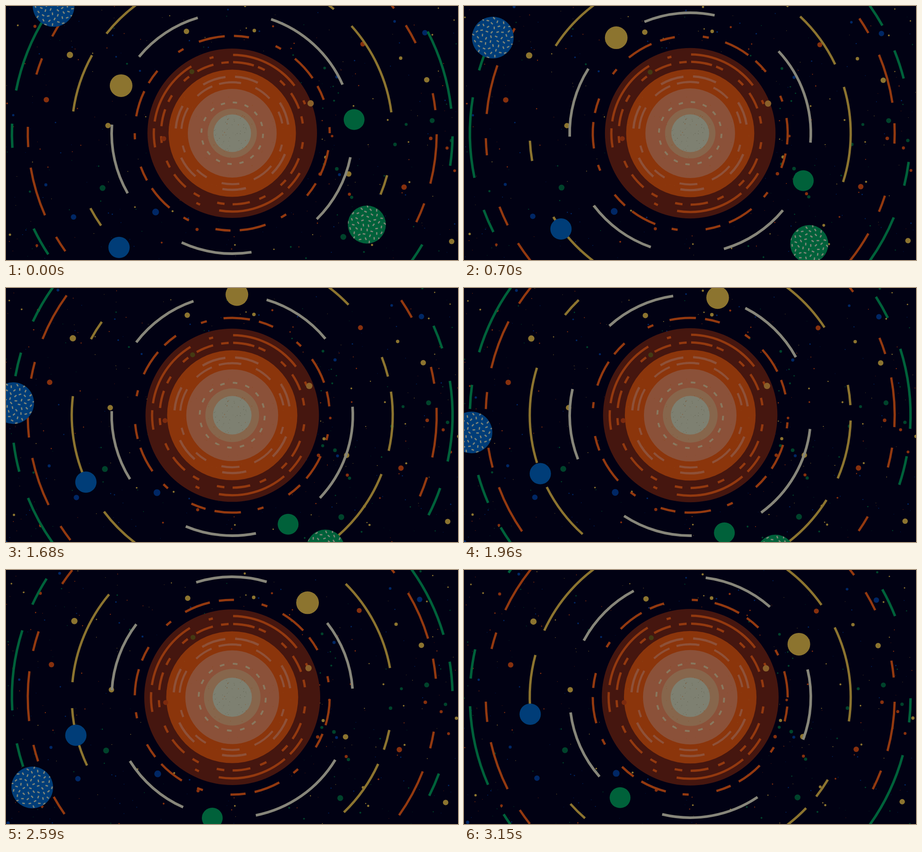
Animation of 997 by 561 pixels, one loop 3220 ms. Source, as an HTML page with a canvas:

```html
<!DOCTYPE html>
<html lang="en">
<head>
<meta charset="utf-8">
<title>Orbits</title>
<style>
  html, body { margin: 0; width: 100%; height: 100%; overflow: hidden; background: #010113; }
  canvas { display: block; }
</style>
</head>
<body>
<canvas id="stage" width="997" height="561"></canvas>
<script>
const ctx = document.getElementById('stage').getContext('2d');
const W = 997, H = 561, CX = 499, CY = 281;
const LOOP = 3220, TICK = 70, STEPS = 36;
const RAD = Math.PI / 180, TAU = Math.PI * 2, GOLDEN = Math.PI * (3 - Math.sqrt(5));

const C = {
  sky: '#010113', white: '#87867a', yellow: '#8c742f', orange: '#93390f',
  green: '#00613a', blue: '#003d78', peach: '#8e5139', cream: '#89785f', mark: '#7f8578',
  redDot: '#86300d', blueDot: '#002765', greenDot: '#00432b'
};
const TINTS = [C.yellow, C.redDot, C.blueDot, C.greenDot];

function seeded(seed) {
  return () => {
    seed = (seed * 1664525 + 1013904223) % 4294967296;
    return seed / 4294967296;
  };
}

// Repeats a group of [offset, length] dashes, in degrees.
function repeat(start, period, count, group) {
  const out = [];
  for (let k = 0; k < count; k++)
    for (const [offset, len] of group) out.push([start + period * k + offset, len]);
  return out;
}

// Angle whose speed follows a parabola over the steps.
const cubic = (a, b, c) => s => a * s + b * s * s - c * s ** 3;
const swell = x => x - 0.08 * Math.sin(TAU * x);

function disc(x, y, r, color) {
  ctx.fillStyle = color;
  ctx.beginPath();
  ctx.arc(x, y, r, 0, TAU);
  ctx.fill();
}

function dashes(r, width, color, list, turn = 0) {
  ctx.strokeStyle = color;
  ctx.lineWidth = width;
  for (const [start, len] of list) {
    ctx.beginPath();
    ctx.arc(CX, CY, r, (start + turn) * RAD, (start + len + turn) * RAD);
    ctx.stroke();
  }
}

const rings = [
  { r: 486, w: 5.5, color: C.green, turn: s => -2.862 * s,
    list: repeat(259.6, 72.9, 5, [[-15, 6.3], [0, 21.1], [28.3, 7.7]]) },
  { r: 451, w: 5, color: C.orange, turn: s => -2.862 * s,
    list: repeat(256.3, 52, 7, [[-11.6, 4.8], [0, 14], [19.8, 5.7]]) },
  { r: 354, w: 5.2, color: C.yellow, turn: cubic(2.88, 0.0413, 0.000888),
    list: [...repeat(15.2, 129.6, 2, [[0, 7.3], [43, 21.3], [73.6, 34.5]]),
      ...repeat(288, 0, 1, [[-12.8, 7.3], [0, 21.3], [30, 34.5]])] },
  { r: 266, w: 5.8, color: C.white, turn: s => 3.535 * s,
    list: [...repeat(11.5, 69.3, 4, [[0, 34]]), [288.8, 47.4]] },
  { r: 215, w: 5, color: C.orange, turn: s => -2.375 * s,
    list: repeat(10, 60, 6, [[0, 15.6], [21, 8.9], [46.4, 3.6]]) }
];

const planets = [
  { r: 46, orbit: 484, color: C.blue, start: 215.5, turn: s => -cubic(0.775, 0.057, 0.000435)(s), marks: 52 },
  { r: 42, orbit: 359, color: C.green, start: 34.2, turn: s => 1.1 * s, marks: 44 },
  { r: 23.5, orbit: 355, color: C.blue, start: 134.7, turn: s => 1.09 * s },
  { r: 25, orbit: 266.7, color: C.yellow, start: 203.2, turn: s => 3.632 * s },
  { r: 23, orbit: 270.5, color: C.green, start: -6.4, turn: s => 3.647 * s }
];

// Sun layers and their flares: radius at the first and last step.
const layers = [
  { from: 187, to: 195, color: '#45160f' },
  { from: 140.5, to: 146.2, color: '#8b350b' },
  { from: 98, to: 104.2, color: '#8b5139' },
  { from: 54.3, to: 63.5, color: '#87664c' },
  { from: 41.5, to: 43.5, color: '#7e8071' }
];
const flares = [
  { from: 173, to: 180, w: 5, color: C.orange,
    list: repeat(270.6, 139, 3, [[0, 50], [64.6, 3], [120, 14]]) },
  { from: 157, to: 162.5, w: 5, color: C.orange,
    list: repeat(270.7, 55, 7, [[0, 14], [20.5, 6], [41.5, 5.5]]) },
  { from: 125, to: 130, w: 5, color: C.peach, list: repeat(272.8, 54.4, 7, [[0, 24]]) },
  { from: 112.5, to: 117, w: 4.5, color: C.peach,
    list: repeat(255, 145, 3, [[0, 25], [42, 20], [80, 14], [118, 8]]) },
  { from: 68, to: 74.8, w: 4, color: C.cream, list: repeat(271, 22.5, 16, [[0, 8]]) }
];

// The few dots large enough to be recognised; the rest are scattered.
const landmarks = [
  [C.yellow, 141, 108, 7], [C.yellow, 398, 56, 6], [C.yellow, 225, 264, 6],
  [C.yellow, 928, 163, 6], [C.yellow, 983, 520, 6], [C.yellow, 756, 371, 6],
  [C.redDot, 89, 207, 6], [C.redDot, 878, 400, 6], [C.redDot, 787, 84, 5.5],
  [C.blueDot, 330, 455, 7.5], [C.blueDot, 924, 59, 6], [C.blueDot, 149, 466, 6],
  [C.greenDot, 213, 402, 6.5], [C.greenDot, 940, 253, 5.5], [C.greenDot, 744, 510, 6.5]
];
const veiled = [
  ['#443a13', 410, 145, 5.5], ['#8a602a', 672, 215, 7], ['#7c2a0e', 348, 293, 5.5]
];

const rnd = seeded(71);
function scatter(count, min, spread) {
  return Array.from({ length: count }, () => [
    TINTS[Math.floor(rnd() * 4)], rnd() * 1040 - 20, rnd() * 590 - 15, min + rnd() ** 2 * spread
  ]);
}
const stars = [...scatter(360, 0.5, 1.1), ...scatter(75, 1.8, 2.4), ...landmarks];
const grain = Array.from({ length: 130 }, (_, n) => {
  const core = n < 45, a = rnd() * TAU, d = Math.sqrt(rnd()) * (core ? 40 : 138);
  return [core ? '#62614f' : '#8a4a1c', CX + Math.cos(a) * d, CY + Math.sin(a) * d, 0.4 + rnd() * 0.4];
});

// Everything in the distance shrinks slowly towards the sun.
function drawDots(list, zoom) {
  for (const [color, x, y, r] of list)
    disc(CX + (x - CX) * zoom, CY + (y - CY) * zoom, r, color);
}

function drawSun(x) {
  const size = o => o.from + (o.to - o.from) * swell(x);
  for (const o of layers) disc(CX, CY, size(o), o.color);
  for (const o of flares) dashes(size(o), o.w, o.color, o.list);
  drawDots(grain, 1);
}

function drawPlanet(p, s) {
  const a = (p.start + p.turn(s)) * RAD;
  const x = CX + Math.cos(a) * p.orbit, y = CY + Math.sin(a) * p.orbit;
  disc(x, y, p.r, p.color);
  if (p.marks) drawMarks(p, x, y, a);
}

function drawMarks(p, x, y, a) {
  const tilt = seeded(p.marks);
  ctx.save();
  ctx.beginPath();
  ctx.arc(x, y, p.r, 0, TAU);
  ctx.clip();
  ctx.translate(x, y);
  ctx.rotate(a);
  ctx.fillStyle = C.mark;
  for (let n = 0; n < p.marks; n++) {
    const d = p.r * Math.sqrt((n + 0.5) / p.marks);
    ctx.save();
    ctx.translate(Math.cos(n * GOLDEN) * d, Math.sin(n * GOLDEN) * d);
    ctx.rotate(tilt() * Math.PI);
    ctx.fillRect(-2.9, -1.4, 5.8, 2.8);
    ctx.restore();
  }
  ctx.restore();
}

function draw(now) {
  const tick = Math.floor((now % LOOP) / TICK);
  // Poses are held on a coarser beat: four of them per five ticks.
  const s = Math.floor(tick * 0.8 + 0.25);
  const zoom = 1 - 0.034 * s / STEPS;
  ctx.fillStyle = C.sky;
  ctx.fillRect(0, 0, W, H);
  drawDots(stars, zoom);
  drawSun(s / STEPS);
  drawDots(veiled, zoom);
  for (const o of rings) dashes(o.r, o.w, o.color, o.list, o.turn(s));
  for (const p of planets) drawPlanet(p, s);
}

function loop() {
  draw(performance.now());
  requestAnimationFrame(loop);
}
loop();
</script>
</body>
</html>
```
